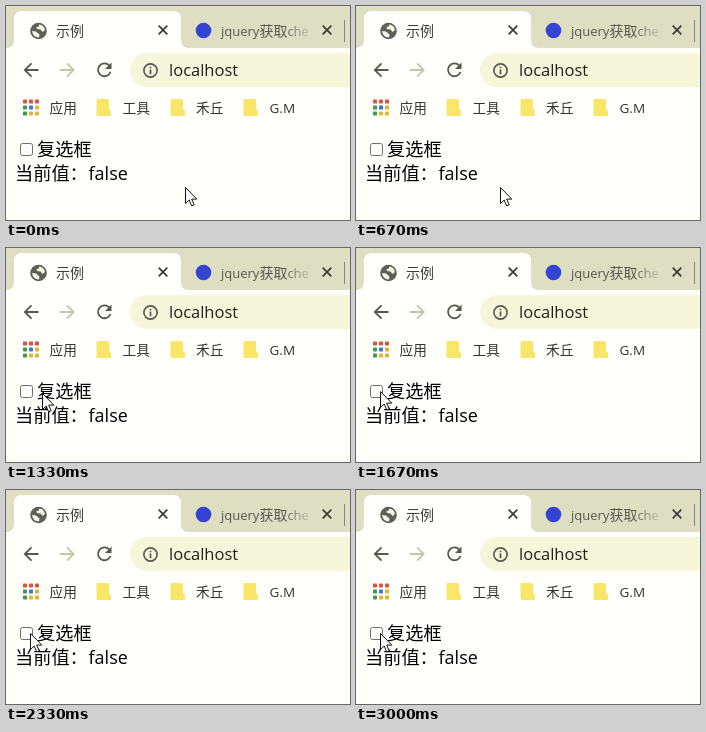
Recreate the animation shown at these times as an HTML page. Size 344x214 px, loop 3.33 s.

```html
<!DOCTYPE html>
<html lang="zh-CN">
<head>
<meta charset="utf-8">
<title>示例</title>
<style>
  html, body { margin: 0; width: 100%; height: 100%; overflow: hidden; background: #fffffb; }
  svg { display: block; width: 344px; height: 214px; }
  text { font-family: "Open Sans", "Noto Sans CJK SC", "Noto Sans CJK", sans-serif; white-space: pre; }
  .tab { font-size: 13px; fill: #3d3f3a; }
  .mark { font-size: 13.7px; fill: #33352f; }
  .page { font-size: 18px; fill: #000; }
  .line { fill: none; stroke: #55584f; stroke-width: 1.8; }
</style>
</head>
<body>
<svg viewBox="0 0 344 214">
  <defs>
    <linearGradient id="fade" gradientUnits="userSpaceOnUse" x1="278" y1="0" x2="309" y2="0">
      <stop offset="0" stop-color="#55574c"/>
      <stop offset="1" stop-color="#55574c" stop-opacity="0"/>
    </linearGradient>
    <path id="close" d="M-4.3-4.3 4.3 4.3M4.3-4.3-4.3 4.3" fill="none" stroke="#383a34" stroke-width="1.7"/>
    <path id="folder" d="M1.5 0H11Q12.5 0 12.5 1.5V10L14.5 12V16Q14.5 17 13.5 17H1.5Q0 17 0 15.5V1.5Q0 0 1.5 0Z" fill="#f9e567"/>
  </defs>

  <!-- tab strip -->
  <rect width="344" height="42" fill="#dedec3"/>
  <path d="M0 42Q8 42 8 34V13Q8 5 16 5H167Q175 5 175 13V34Q175 42 183 42Z" fill="#fffffb"/>
  <circle cx="32.5" cy="25" r="8.3" fill="#5d6058"/>
  <path d="M26 25 30 25.5 33.5 28.5 33 31.5Q27 31.5 26 25ZM33 18.6Q38 19 39 24L36.5 26 34.5 23.5 31 23 30.5 21 33 20.5Z" fill="#f6f6e8"/>
  <text class="tab" x="50" y="29.8" style="font-size:14px">示例</text>
  <use href="#close" x="157" y="24"/>
  <circle cx="197.5" cy="24.5" r="7.8" fill="#3443d2"/>
  <text class="tab" x="215" y="29.8" style="fill:url(#fade)">jquery<tspan font-size="14">获取</tspan>che</text>
  <use href="#close" x="321" y="24"/>
  <path d="M338.5 14V36" stroke="#87887a"/>

  <!-- toolbar -->
  <rect y="42" width="344" height="76" fill="#fffffb"/>
  <path class="line" d="M32.5 64H19M25.5 57.3 18.8 64 25.5 70.7"/>
  <path class="line" d="M54 64H67.5M61 57.3 67.7 64 61 70.7" style="stroke:#c4c5a8"/>
  <path class="line" d="M103.2 59.5A6.4 6.4 0 1 0 104.5 66"/>
  <path d="M105.5 56.5V63H99Z" fill="#55584f"/>
  <rect x="124" y="47" width="240" height="34" rx="17" fill="#f5f6da"/>
  <circle class="line" cx="144.5" cy="64.5" r="6.6" style="stroke-width:1.6"/>
  <path d="M144.5 60.7V62.3M144.5 63.6V68.2" stroke="#55584f" stroke-width="1.7"/>
  <text x="163" y="69.8" font-size="16.5" fill="#202219">localhost</text>

  <!-- bookmarks -->
  <g id="apps"></g>
  <text class="mark" x="43.5" y="107">应用</text>
  <use href="#folder" x="90.5" y="93"/>
  <text class="mark" x="116.5" y="107">工具</text>
  <use href="#folder" x="164.5" y="93"/>
  <text class="mark" x="190" y="107">禾丘</text>
  <use href="#folder" x="237.5" y="93"/>
  <text class="mark" x="263.5" y="107" style="font-size:13.5px">G.M</text>

  <!-- page -->
  <rect id="box" x="14.5" y="137.5" width="12" height="12" rx="2" fill="#fff" stroke="#6f706a"/>
  <path id="tick" d="M16.8 143.7 19.5 146.4 24.5 140.5" fill="none" stroke="#fff" stroke-width="2"/>
  <text class="page" x="31" y="150" style="font-size:18.2px">复选框</text>
  <text class="page" x="9" y="174" style="font-size:18.2px">当前值：</text>
  <text class="page" id="value" x="82.5" y="174">false</text>
  <path id="cursor" d="M.5.5V16.5L4.2 13 6.7 18.9 9.2 17.8 6.7 12.1H11.8Z" fill="#fff" stroke="#111" stroke-width="1"/>
</svg>
<script>
  const $ = id => document.getElementById(id);
  const LOOP = 3330;

  // start time, cursor x, cursor y, checked
  const steps = [
    [0, 179, 181, false],
    [670, 144, 181, false],
    [1000, 78, 167, false],
    [1330, 36, 145, false],
    [1670, 24, 143, false],
    [2000, 24, 143, true],
    [2330, 24, 143, false],
    [2670, 24, 143, true],
    [3000, 24, 143, false]
  ];

  const dots = ['#e2503d', '#e2503d', '#e2503d', '#3c9a55', '#3d73dc', '#e6b52f', '#3c9a55', '#e6b52f', '#e6b52f'];
  $('apps').innerHTML = dots.map((color, i) =>
    `<rect x="${17 + i % 3 * 6}" y="${93.5 + Math.floor(i / 3) * 6}" width="4" height="4" rx=".8" fill="${color}"/>`
  ).join('');

  function draw() {
    const t = performance.now() % LOOP;
    const [, x, y, checked] = steps.filter(step => step[0] <= t).pop();
    $('cursor').setAttribute('transform', `translate(${x} ${y})`);
    $('box').setAttribute('fill', checked ? '#0b62ad' : '#fff');
    $('box').setAttribute('stroke', checked ? '#0b62ad' : '#6f706a');
    $('tick').setAttribute('visibility', checked ? 'visible' : 'hidden');
    $('value').textContent = String(checked);
    requestAnimationFrame(draw);
  }
  draw();
</script>
</body>
</html>
```
